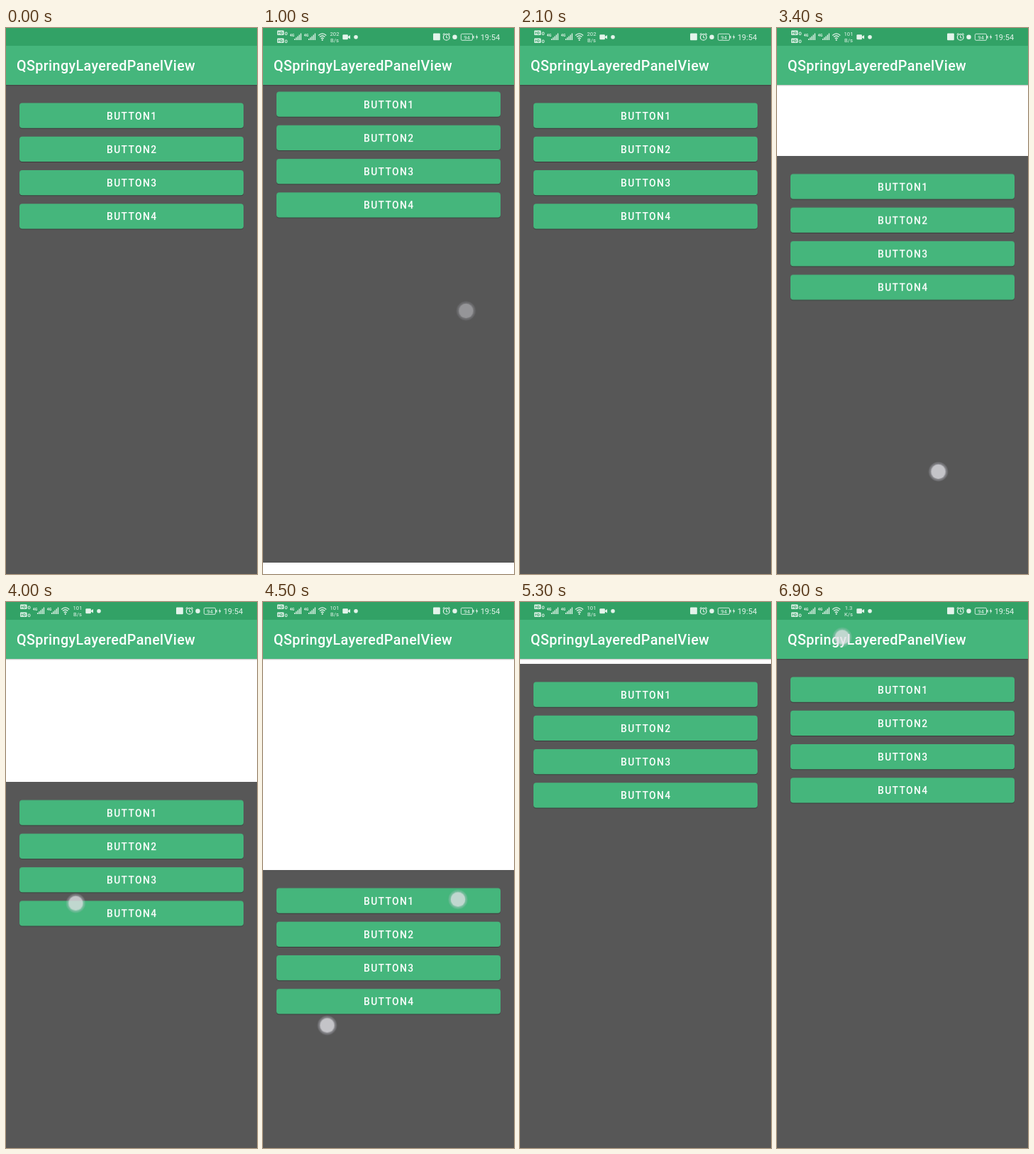
Animation, 354 px wide and 768 px high, one loop 7 s. Source, as an HTML page:

```html
<!DOCTYPE html>
<html lang="en">
<head>
<meta charset="utf-8">
<title>Damped scroll</title>
<style>
html, body { margin: 0; width: 100%; height: 100%; overflow: hidden; background: #fff; }
svg { display: block; width: 100vw; height: 100vh; font-family: Roboto, sans-serif; }
.title { font-size: 19.7px; font-weight: 500; letter-spacing: .4px; fill: #fff; }
.label { font-size: 13.77px; font-weight: 500; letter-spacing: 1.45px; fill: #fff; }
.status { fill: #e4f4eb; animation: icons 7s step-end infinite; }
.line { fill: none; stroke: #e4f4eb; }
.tiny { font-size: 7.6px; text-anchor: middle; }
.micro { font-size: 5.2px; font-weight: 700; }

.content { animation: scroll 7s linear infinite; }
.rate { animation: 7s step-end infinite; }
.rate.a { animation-name: rateA; }
.rate.b { animation-name: rateB; }
.rate.c { animation-name: rateC; }
.touch { opacity: 0; animation: 7s linear infinite; }
.push { animation-name: push; }
.pull1 { animation-name: pull1; }
.pull2 { animation-name: pull2; }
.pull3 { animation-name: pull3; }
.shade { animation-name: shade; }

@keyframes icons { 0% { opacity: 0; } 1.428%, 100% { opacity: 1; } }
@keyframes rateA { 0% { opacity: 1; } 35.71%, 100% { opacity: 0; } }
@keyframes rateB { 0% { opacity: 0; } 35.71% { opacity: 1; } 88.57%, 100% { opacity: 0; } }
@keyframes rateC { 0% { opacity: 0; } 88.57%, 100% { opacity: 1; } }

@keyframes scroll {
  0%, 12.2% { transform: translateY(0); animation-timing-function: ease-out; }
  21.43% { transform: translateY(-45.8px); }
  22.9% { transform: translateY(-46px); animation-timing-function: cubic-bezier(.37, 0, .63, 1); }
  25.9%, 40.5% { transform: translateY(0); }
  48.57% { transform: translateY(99.8px); }
  53.6% { transform: translateY(104px); }
  62.14% { transform: translateY(270px); }
  64.29% { transform: translateY(296.8px); }
  72.14%, 73% { transform: translateY(406px); animation-timing-function: cubic-bezier(.37, 0, .63, 1); }
  75.98%, 100% { transform: translateY(0); }
}
@keyframes push {
  0%, 11.42% { opacity: 0; transform: translate(284px, 461px); }
  11.43% { opacity: .58; transform: translate(284px, 461px); animation-timing-function: ease-out; }
  21.43%, 22.6% { opacity: .58; transform: translate(289.5px, 313.5px); }
  24%, 100% { opacity: 0; transform: translate(289.5px, 313.5px); }
}
@keyframes pull1 {
  0%, 39.99% { opacity: 0; transform: translate(240px, 300px); }
  40% { opacity: 1; transform: translate(240px, 300px); }
  48.57% { opacity: 1; transform: translate(227.5px, 624px); }
  52.86% { opacity: 1; transform: translate(227px, 633px); }
  54.29%, 100% { opacity: 0; transform: translate(227px, 633px); }
}
@keyframes pull2 {
  0%, 53.56% { opacity: 0; transform: translate(104px, 300px); }
  53.57% { opacity: 1; transform: translate(104px, 300px); }
  62.14%, 64.4% { opacity: 1; transform: translate(90.5px, 595.5px); }
  66%, 100% { opacity: 0; transform: translate(90.5px, 595.5px); }
}
@keyframes pull3 {
  0%, 62.13% { opacity: 0; transform: translate(277px, 348px); }
  62.14% { opacity: 1; transform: translate(277px, 348px); }
  64.29% { opacity: 1; transform: translate(275px, 418px); }
  72.14%, 72.9% { opacity: 1; transform: translate(268px, 675px); }
  74.2%, 100% { opacity: 0; transform: translate(268px, 675px); }
}
@keyframes shade {
  0%, 97.13% { opacity: 0; transform: translate(92px, 24px); }
  97.14% { opacity: 1; transform: translate(92px, 24px); }
  98.57%, 100% { opacity: 1; transform: translate(92px, 49.5px); }
}
</style>
</head>
<body>
<svg viewBox="0 0 354 768" preserveAspectRatio="none">
  <defs>
    <linearGradient id="drop" x2="0" y2="1">
      <stop offset="0" stop-opacity=".25"/>
      <stop offset="1" stop-opacity="0"/>
    </linearGradient>
    <g id="button">
      <rect x="19" y="106.4" width="316" height="35.4" rx="4" fill="#000" opacity=".32"/>
      <rect x="19" y="105.5" width="316" height="35.2" rx="4" fill="#45b67c"/>
    </g>
    <g id="dot">
      <circle r="13.5" fill="#c4c4d0" opacity=".25"/>
      <circle r="11.6" fill="#dcdce4" opacity=".22"/>
      <circle r="10.2" fill="#e4e4e8" opacity=".65"/>
    </g>
    <g id="hd">
      <rect x="20" y="3.5" width="9.5" height="6.5" rx="1"/>
      <text class="micro" x="21" y="8.7" style="fill:#32a266">HD</text>
      <rect class="line" x="31.3" y="6" width="2.6" height="3.6" rx=".8"/>
    </g>
    <g id="signal">
      <text class="micro" x="37.8" y="11.5">4G</text>
      <path d="M44 15h1.3v2H44zM46.2 13.3h1.3V17h-1.3zM48.4 11.4h1.3V17h-1.3zM50.6 9.5h1.3V17h-1.3zM52.8 7.5h1.3V17h-1.3z"/>
    </g>
  </defs>

  <rect width="354" height="768" fill="#fff"/>
  <g class="content">
    <rect y="80" width="354" height="688" fill="#575757"/>
    <g id="buttons"></g>
  </g>

  <rect y="80" width="354" height="2" fill="url(#drop)"/>
  <rect width="354" height="80" fill="#45b67c"/>
  <rect width="354" height="25" fill="#32a266"/>
  <text class="title" x="15" y="60">QSpringyLayeredPanelView</text>

  <g class="status">
    <use href="#hd"/>
    <use href="#hd" y="11"/>
    <use href="#signal"/>
    <use href="#signal" x="20"/>
    <path class="line" stroke-width="1.3" d="M78.2 10.4Q83.7 5.4 89.2 10.4M80 12.6Q83.7 9.4 87.4 12.6M81.7 14.8Q83.7 13.2 85.7 14.8"/>
    <circle cx="83.7" cy="16.8" r="1.1"/>
    <g class="tiny">
      <g class="rate a"><text x="101" y="11">202</text><text x="101" y="20">B/s</text></g>
      <g class="rate b"><text x="101" y="11">101</text><text x="101" y="20">B/s</text></g>
      <g class="rate c"><text x="101" y="11">1.3</text><text x="101" y="20">K/s</text></g>
    </g>
    <rect x="112.3" y="9.2" width="7.6" height="7" rx="1.2"/>
    <path d="M120 12l3-2v5.4l-3-2z"/>
    <circle cx="131" cy="12.7" r="2.8"/>
    <rect x="240" y="7.5" width="9.8" height="9.8" rx="1"/>
    <circle class="line" cx="258.7" cy="12.9" r="4.3" stroke-width="1.2"/>
    <path class="line" stroke-width="1.1" d="M258.7 10.3v2.9l1.8 1M253.7 9.3l2.2-1.9M263.7 9.3l-2.2-1.9"/>
    <circle cx="270.5" cy="12.7" r="3.2"/>
    <rect class="line" x="279.3" y="8.3" width="16.2" height="9" rx="1.5" stroke-width=".9"/>
    <rect x="296.3" y="11" width="1.3" height="3.6"/>
    <text class="tiny" x="287.4" y="15.7">94</text>
    <path d="M302 8.8l-2.2 4.5h1.6l-.7 3.5 2.6-4.7h-1.7z"/>
    <text x="306.7" y="16.7" font-size="11">19:54</text>
  </g>

  <use class="touch push" href="#dot"/>
  <use class="touch pull1" href="#dot"/>
  <use class="touch pull2" href="#dot"/>
  <use class="touch pull3" href="#dot"/>
  <use class="touch shade" href="#dot"/>
</svg>
<script>
const pitch = 47.25;
document.getElementById('buttons').innerHTML = [0, 1, 2, 3].map(i => `
  <g transform="translate(0 ${i * pitch})">
    <use href="#button"/>
    <text class="label" x="142" y="128.6">BUTTON${i + 1}</text>
  </g>`).join('');
</script>
</body>
</html>
```
